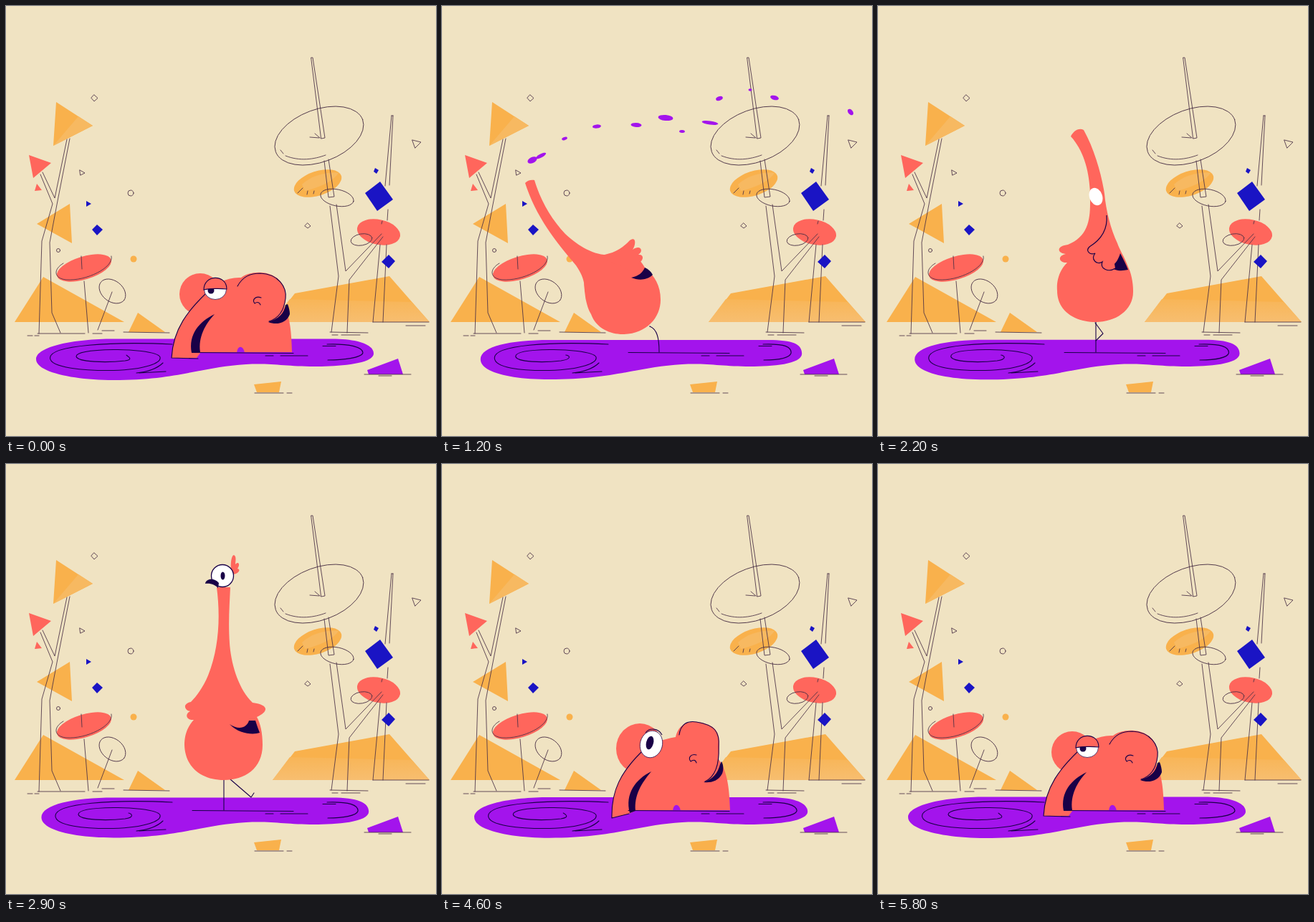
Recreate the animation shown at these times as an HTML page. Size 600 by 600 pixels, loop 5850 ms.

```html
<!DOCTYPE html>
<html lang="en">
<head>
<meta charset="utf-8">
<title>Pond bird</title>
<style>
html, body { margin: 0; width: 100%; height: 100%; overflow: hidden; background: #f0e3c2; }
svg { display: block; width: 100vw; height: 100vh; }
.line { fill: none; stroke: #4a3045; stroke-width: .85; stroke-linejoin: round; stroke-linecap: round; }
.ink { fill: none; stroke: #190047; stroke-width: 1.1; stroke-linejoin: round; stroke-linecap: round; }
.orange { fill: #f9b14c; }
.pale { fill: #f7b961; }
.coral { fill: #ff665c; }
.blue { fill: #1a14c4; }
.purple { fill: #a314ec; }
.navy { fill: #190047; }
.white { fill: #fff; }
</style>
</head>
<body>
<svg id="stage" viewBox="0 0 600 600">
  <defs>
    <linearGradient id="fade" x2="0" y2="1">
      <stop offset="0" stop-color="#f8b557"/><stop offset="1" stop-color="#f7be70"/>
    </linearGradient>
  </defs>

  <!-- left grove -->
  <path class="orange" d="M52 378L165 441H12ZM184 428L222 455H171ZM89 276L43 304L92 331ZM70 134L121 167L66 195Z"/>
  <path class="pale" d="M66 195L101 154L121 167Z"/>
  <path class="coral" d="M32 208L63 219L38 240ZM43 248L50 257L40 258Z"/>
  <ellipse class="coral" cx="109" cy="365.500" rx="39.500" ry="16" transform="rotate(-17 109 365.500)"/>
  <path class="line" d="M85 186L68 268L51 232M48 235L65 276L50 328L46 457M89 185L71 277L61 330L64 428L76 456
    M44 457H110M30 460H37M40 460H46M105 349L106 367M109 384L115 456M80 359C66 367 66 380 84 382C112 384 151 365 147 349
    M148 399L128 452M134 453H151M121 457H134M164 455L228 456"/>
  <ellipse class="line" cx="148.500" cy="398" rx="20.500" ry="14.500" transform="rotate(38 148.500 398)"/>

  <!-- right grove -->
  <path class="orange" d="M403 401L535 377L591 441H372Z"/>
  <path fill="url(#fade)" d="M396 409L566 413L591 441H372Z"/>
  <ellipse class="orange" cx="435" cy="247.500" rx="34.500" ry="17" transform="rotate(-18 435 247.500)"/>
  <path class="pale" d="M413 249C425 237 448 231 464 233C458 243 440 253 417 258Z"/>
  <ellipse class="coral" cx="520" cy="315.500" rx="30.500" ry="17.500" transform="rotate(12 520 315.500)"/>
  <ellipse class="line" cx="437" cy="181" rx="64.700" ry="36.600" transform="rotate(-20.300 437 181)"/>
  <ellipse class="line" cx="462" cy="267.500" rx="23.500" ry="11.500" transform="rotate(12 462 267.500)"/>
  <ellipse class="line" cx="496" cy="326" rx="15" ry="8" transform="rotate(-10 496 326)"/>
  <path class="line" d="M426 72H428L445 184L440 185ZM424 183L437 184M431 178L438 184M383 201L387 206M390 209C410 217 430 214 446 208
    M444 216L450 267L458 266L450 214M407 261L414 254M420 263L421 258M429 262L430 258
    M452 279L464 377L454 455M461 277L474 370L524 318M526 322L479 382L476 456M452 455L505 456M468 459H494M455 459H463
    M538 153L529 251M525 300L524 304M522 333L512 441M540 153L535 250M533 284L532 299M531 333L526 441M538 153L540 153M512 441H590M558 446H585"/>
  <path class="blue" d="M522 245L540 270L518 286L501 261ZM515 226L520 229L517 234L513 231ZM534 347L543 356L534 366L524 357Z
    M112 272L119 276L112 280ZM127 305L135 312L127 320L120 312Z"/>

  <!-- floating bits -->
  <path class="line" d="M123 124L128 128.500L123 133L119 128.500ZM103 229L110 233L104 236ZM421 303L425 307L421 310L417 307ZM567 187L579 190L571 198Z"/>
  <circle class="line" cx="174" cy="261" r="4"/>
  <circle class="line" cx="73" cy="341" r="2.500"/>
  <circle class="orange" cx="178" cy="353" r="4.500"/>

  <!-- foreground -->
  <path class="purple" d="M504 508L547 492L554 514H506Z"/>
  <path class="orange" d="M346 528L384 524L381 539H350Z"/>
  <path class="line" d="M500 514H565M520 516H538M347 540H387M392 540H399"/>

  <path id="pond" class="purple"/>
  <path id="ripples" class="ink"/>
  <g id="drops"></g>
  <g id="sit"></g>
  <g id="stand"></g>
  <path class="ink" d="M260 483.500L401 484.500M362 488H373M383 488H421"/>
</svg>
<script>
const LOOP = 5850, STEP = 50;
const NUM = /-?\d+(\.\d+)?/g;
const byId = id => document.getElementById(id);

function add(parent, tag, cls) {
  const el = document.createElementNS('http://www.w3.org/2000/svg', tag);
  el.setAttribute('class', cls);
  byId(parent).append(el);
  return el;
}

// Blend two strings number by number
function mix(a, b, k) {
  const to = b.match(NUM);
  let i = 0;
  return a.replace(NUM, v => (+v + (to[i++] - v) * k).toFixed(2));
}

function shift(d, dx, dy) {
  let i = 0;
  return d.replace(NUM, v => +v + (i++ % 2 ? dy : dx));
}

function collapse(d, x, y) {
  let i = 0;
  return d.replace(NUM, () => i++ % 2 ? y : x);
}

const smooth = k => k * k * (3 - 2 * k);

function poseAt(track, t) {
  let i = 0;
  while (i < track.length - 2 && t >= track[i + 1][0]) i++;
  const [t0, a] = track[i], [t1, b] = track[i + 1];
  const k = smooth(Math.min(1, Math.max(0, (t - t0) / (t1 - t0))));
  const out = {};
  for (const key in a) out[key] = mix(a[key], b[key], k);
  return out;
}

function build(parent, spec) {
  const parts = {};
  for (const [name, tag, cls] of spec) parts[name] = add(parent, tag, cls);
  return parts;
}

function apply(parts, pose) {
  for (const name in parts) {
    const el = parts[name];
    if (el.tagName === 'path') {
      el.setAttribute('d', pose[name]);
    } else {
      const [x, y, rx, ry, turn] = pose[name].split(' ');
      el.setAttribute('rx', rx);
      el.setAttribute('ry', ry);
      el.setAttribute('transform', `translate(${x} ${y}) rotate(${turn})`);
    }
  }
}

// Bird folded into the pond
const sitParts = build('sit', [
  ['cheek', 'ellipse', 'coral'], ['body', 'path', 'coral'], ['mouth', 'path', 'navy'],
  ['gap', 'path', 'navy'], ['edge', 'path', 'ink'], ['bump', 'path', 'ink'],
  ['curl', 'path', 'ink'], ['notch', 'path', 'purple'], ['eye', 'ellipse', 'white'],
  ['pupil', 'ellipse', 'navy'], ['lid', 'path', 'coral']
]);
for (const [name, width] of [['eye', 0.7], ['lid', 1.1]]) {
  sitParts[name].setAttribute('stroke', '#190047');
  sitParts[name].setAttribute('stroke-width', width);
}

const sleepy = {
  cheek: '271 402 29 29 0',
  body: 'M231 491C233 450 255 424 278 402C290 388 308 378 328 379C340 369 372 367 385 387C393 400 390 412 388 420C397 435 398 455 399 483L272 483L266 491Z',
  mouth: 'M366 441C380 436 388 430 390 417L393 416C395 421 396 426 396 430C392 442 378 446 366 441Z',
  gap: 'M291 430C270 440 254 458 259 484L271 483C268 462 278 444 291 430Z',
  edge: 'M268 492L231 491C233 450 255 424 280 400',
  bump: 'M323 391C330 378 340 373 355 373C380 374 392 392 390 408C388 425 380 436 367 440',
  curl: 'M356 407C348 404 343 410 347 415C351 412 354 414 355 417',
  notch: 'M322 484C323 473 331 473 333 484Z',
  eye: '292 395.500 15.500 14 0',
  pupil: '286 397 4.500 4.500 0',
  lid: 'M276 396C276 374 308 374 308 395C300 394 284 394 276 396Z'
};
const awake = {
  cheek: '276 397 33 35 0',
  body: 'M237 494C236 455 250 430 277 403C290 390 308 384 326 381C331 358 352 356 372 364C391 372 387 390 386 412C399 430 401 455 402 483L271 483L261 488Z',
  mouth: 'M365 444C378 440 385 431 388 419L390 415C393 420 393 427 391 432C385 443 375 445 365 444Z',
  gap: 'M292 429C270 440 255 460 262 487L270 484C268 462 278 446 292 429Z',
  edge: 'M261 488L237 494C236 455 250 430 278 402',
  bump: 'M331 378C333 362 343 358 355 360C380 364 388 373 386 395C387 418 382 436 367 443',
  curl: 'M355 406C347 404 343 410 347 415C351 412 354 413 355 417',
  notch: 'M322 484C323 473 331 473 333 484Z',
  eye: '292 391 15.500 19 15',
  pupil: '290 389 5 9.500 15',
  lid: 'M284 375C289 368 302 368 307 378C302 368 289 368 284 375Z'
};
const sitTrack = [
  [0, sleepy], [550, sleepy], [700, awake], [850, awake],
  [4600, awake], [4900, awake], [5200, sleepy], [5850, sleepy]
];

// Bird out of the water
const standParts = build('stand', [
  ['leg', 'path', 'ink'], ['bent', 'path', 'ink'], ['body', 'path', 'coral'], ['navy', 'path', 'navy'],
  ['wing', 'path', 'coral'], ['crest', 'path', 'coral'], ['face', 'ellipse', 'white'],
  ['beak', 'path', 'navy'], ['pupil', 'ellipse', 'navy']
]);
standParts.wing.setAttribute('stroke', '#190047');
standParts.face.setAttribute('stroke', '#190047');

const tall = {
  leg: 'M304 440C304 455 304 470 304 483',
  bent: 'M313 440L342 465L346 459',
  body: 'M294 139C300 200 297 255 278 303C272 318 266 328 262 333C250 334 251 343 260 344C253 349 256 358 264 357C253 368 249 380 250 392C250 425 275 441 304 441C333 441 358 425 358 392C358 375 355 362 350 352C364 344 366 335 345 334C325 312 315 265 312 215C309 190 312 165 313 139C307 139 300 139 294 139Z',
  navy: 'M314 364C325 372 335 368 337 357L350 359C352 365 354 370 355 374C345 377 325 377 314 364Z',
  ink: '0',
  crest: 'M313 112C315 109 319 112 320 116C322 120 322 124 322 127C322 132 320 135 319 137C318 139 316 139 314 139Z',
  face: '302 123 14.500 18 0',
  beak: 'M298 134C292 130 284 132 284 149C289 148 296 145 298 139Z',
  pupil: '302 123 3.500 5 0'
};
const spin = {
  leg: tall.leg,
  bent: 'M303 442L314 457L304 467',
  body: 'M269 182C290 205 297 240 296 275C296 300 292 322 265 333C248 335 250 345 262 346C249 349 253 359 264 358C252 370 249 385 250 397C250 428 278 441 304 441C331 441 357 425 356 397C356 385 353 372 349 364C344 350 337 340 334 331C325 312 318 285 316 262C312 235 302 200 287 173C280 169 272 175 269 182Z',
  navy: 'M325 364C332 360 336 352 338 345L338 345C342 353 346 360 349 368C340 370 330 370 325 364Z',
  wing: 'M319 292C321 315 308 328 295 336C289 342 296 348 303 345C296 354 306 362 313 357C309 367 322 372 331 366',
  ink: '1.2',
  crest: collapse(tall.crest, 304, 266),
  face: '304 266 9 12.500 -20',
  beak: collapse(tall.beak, 304, 266),
  pupil: '304 266 0 0 0'
};
tall.wing = collapse(spin.wing, 335, 345);
const proud = {
  ...tall,
  body: 'M294 172C299 210 298 255 282 295C275 312 265 325 258 332C245 335 250 344 257 345C248 350 253 358 262 357C252 368 249 380 249 392C250 425 275 441 304 441C333 441 358 425 358 392C358 375 355 362 350 353C366 346 368 336 344 333C325 315 314 280 312 250C310 220 312 195 313 172C307 172 300 172 294 172Z',
  navy: 'M312 363C325 372 336 368 339 358L348 358C350 364 352 370 354 375C345 378 325 377 312 363Z',
  crest: 'M314 147C313 137 315 127 318 127C322 129 320 136 320 140C325 135 327 141 323 146C328 147 325 153 317 154Z',
  face: '302 156 15.500 15.500 0',
  beak: 'M297 166C290 158 279 160 278 167C286 166 292 169 296 173Z',
  pupil: '302.500 156 3 5.500 0'
};
const fling = {
  ...spin,
  leg: 'M290 447C300 451 303 463 303 483',
  bent: 'M290 447L290 447L290 447',
  body: 'M116 247C133 300 165 335 187 362C194 372 197 380 198 386C198 390 199 395 199 398C200 404 200 408 201 411C203 420 205 425 208 430C215 450 235 458 252 458C285 458 305 435 305 410C305 390 297 377 283 365C275 350 262 345 240 346C215 352 188 333 172 318C152 297 137 270 129 243C125 242 119 243 116 247Z',
  navy: 'M264 379C274 377 280 372 283 365L283 365C288 367 291 370 294 375C286 383 274 383 264 379Z',
  wing: 'M215 348C235 348 250 340 262 327C272 320 270 335 266 340C277 332 282 342 274 347C283 346 281 356 274 359C279 362 276 366 268 372',
  ink: '0',
  crest: collapse(tall.crest, 165, 310),
  face: '165 310 0 0 0',
  beak: collapse(tall.beak, 165, 310),
  pupil: '165 310 0 0 0'
};
const hidden = {
  wing: collapse(spin.wing, 305, 390), ink: '0',
  crest: collapse(tall.crest, 305, 390), beak: collapse(tall.beak, 305, 390),
  face: '305 390 0 0 0', pupil: '305 390 0 0 0'
};
const upright = { ...tall, ...hidden, bent: 'M304 440L304 440L304 440' };
const right = {
  ...upright,
  body: 'M440 200C400 250 360 310 320 330C300 340 280 350 272 360C268 364 264 368 262 372C259 376 257 380 256 384C254 388 253 392 252 398C252 430 280 450 305 450C335 450 360 430 360 398C360 388 360 380 358 370C362 360 368 350 374 342C395 315 410 290 425 265C435 245 445 225 452 208C449 203 445 200 440 200Z'
};
const dive = {
  ...upright,
  leg: 'M330 470C330 475 330 480 330 483',
  bent: 'M330 470L330 470L330 470',
  body: 'M262 488C260 455 272 425 290 408C289 412 287 416 286 420C284 426 282 432 281 438C279 444 278 450 277 456C276 464 275 472 274 480C285 484 310 484 330 484C360 484 385 484 400 483C399 455 397 430 388 412C388 390 375 365 345 367C315 367 288 382 270 408C250 430 238 460 237 492C245 492 255 490 262 488Z',
  navy: awake.mouth,
  face: awake.eye,
  pupil: awake.pupil
};
const bow = {
  ...tall,
  body: 'M205 300C215 265 245 255 265 280C275 300 275 320 268 333C258 336 256 344 262 346C256 350 256 358 264 358C253 368 250 382 250 395C250 428 276 444 306 444C335 444 362 425 360 395C360 378 356 365 350 356C352 346 350 340 344 334C325 310 315 270 295 245C265 205 205 220 188 290C190 297 198 302 205 300Z',
  crest: shift(tall.crest, -107, 180),
  beak: shift(tall.beak, -107, 180),
  face: '195 303 14.500 17 -10',
  pupil: '195 303 3.500 5 0'
};
const standTrack = [
  [850, dive], [970, right], [1060, upright], [1170, fling], [1300, fling],
  [1800, spin], [2200, spin], [2550, proud], [2950, proud], [3200, tall],
  [3750, tall], [3950, bow], [4200, dive]
];

// Water thrown along the path of the neck: x, y, rx, ry, turn
const drops = [
  [126, 215, 7, 4, -25], [138, 209, 8, 2.5, -28], [171, 185, 4, 2, -20], [216, 168, 6, 2.6, -6],
  [271, 166, 7.5, 3, 3], [312, 156, 10.5, 4, 5], [335, 175, 4, 2, 5], [374, 163, 11.5, 2.6, 8],
  [387, 129, 5, 2.8, -20], [430, 117, 2.5, 1.8, 0], [464, 128, 6, 3, 15], [570, 148, 5, 3.2, 50]
].map(d => ({ d, el: add('drops', 'ellipse', 'purple') }));

function drawDrops(t) {
  for (const { d: [x, y, rx, ry, turn], el } of drops) {
    const born = 960 + (570 - x) * 0.45;
    const show = t >= Math.min(born, 1170) && t < 1750;
    el.style.display = show ? '' : 'none';
    if (!show) continue;
    const s = (t - 1200) / 1000;
    const px = x + (x - 300) * 0.25 * s, py = y - 30 * s + 330 * s * s;
    const size = Math.min(1, Math.max(0, (1750 - t) / 450));
    el.setAttribute('rx', rx * size);
    el.setAttribute('ry', ry * size);
    el.setAttribute('transform', `translate(${px} ${py}) rotate(${turn})`);
  }
}

// The pond shrinks as the bird leaves, then slowly fills again
function drawPond(t) {
  const p = t < 850 ? 0 : t < 1100 ? 12 * (t - 850) / 250 : 12 * (5800 - t) / 4700;
  const l = 42 + p, r = 513 - p * 0.92, top = 464.5 + p * 0.13, low = 522 - p * 0.08;
  byId('pond').setAttribute('d', `M${l} 493C${l} 475 95 ${top} 150 ${top}L455 ${top}C490 ${top} ${r} 472 ${r} 485
    C${r} 500 460 503 430 503C390 503 370 498 335 500C270 504 240 ${low} 150 ${low}C95 ${low} ${l} 511 ${l} 493Z`);
  const a = l + 19.5, b = 98 + p * 0.4, e = r - 15;
  byId('ripples').setAttribute('d', `M232 472C150 468 ${a} 473 ${a} 491C${a} 505 110 509 150 508.500
    C195 507 217 498 215 490C212 482 170 479 150 479.500C115 480 ${b} 484 ${b} 489C${b + 2} 497 140 498 166 495C180 493 ${168 + p} 488 ${168 + p * 0.4} 487
    M186 512L223 510M182 512C198 511 212 505 219 498M442 474.500H460M448 472C480 471 ${e} 476 ${e} 484C${e - 2} 491 470 494 449 494`);
}

function draw(time) {
  const t = Math.floor(time % LOOP / STEP) * STEP;
  const sitting = t < 850 || t >= 4200;
  byId('sit').style.display = sitting ? '' : 'none';
  byId('stand').style.display = sitting ? 'none' : '';
  if (sitting) {
    apply(sitParts, poseAt(sitTrack, t));
  } else {
    const pose = poseAt(standTrack, t);
    apply(standParts, pose);
    standParts.wing.setAttribute('stroke-width', pose.ink);
    standParts.face.setAttribute('stroke-width', Math.min(1.3, pose.pupil.split(' ')[2]));
  }
  drawDrops(t);
  drawPond(t);
}

const start = performance.now();
function tick() {
  draw(performance.now() - start);
  requestAnimationFrame(tick);
}
tick();
</script>
</body>
</html>
```
